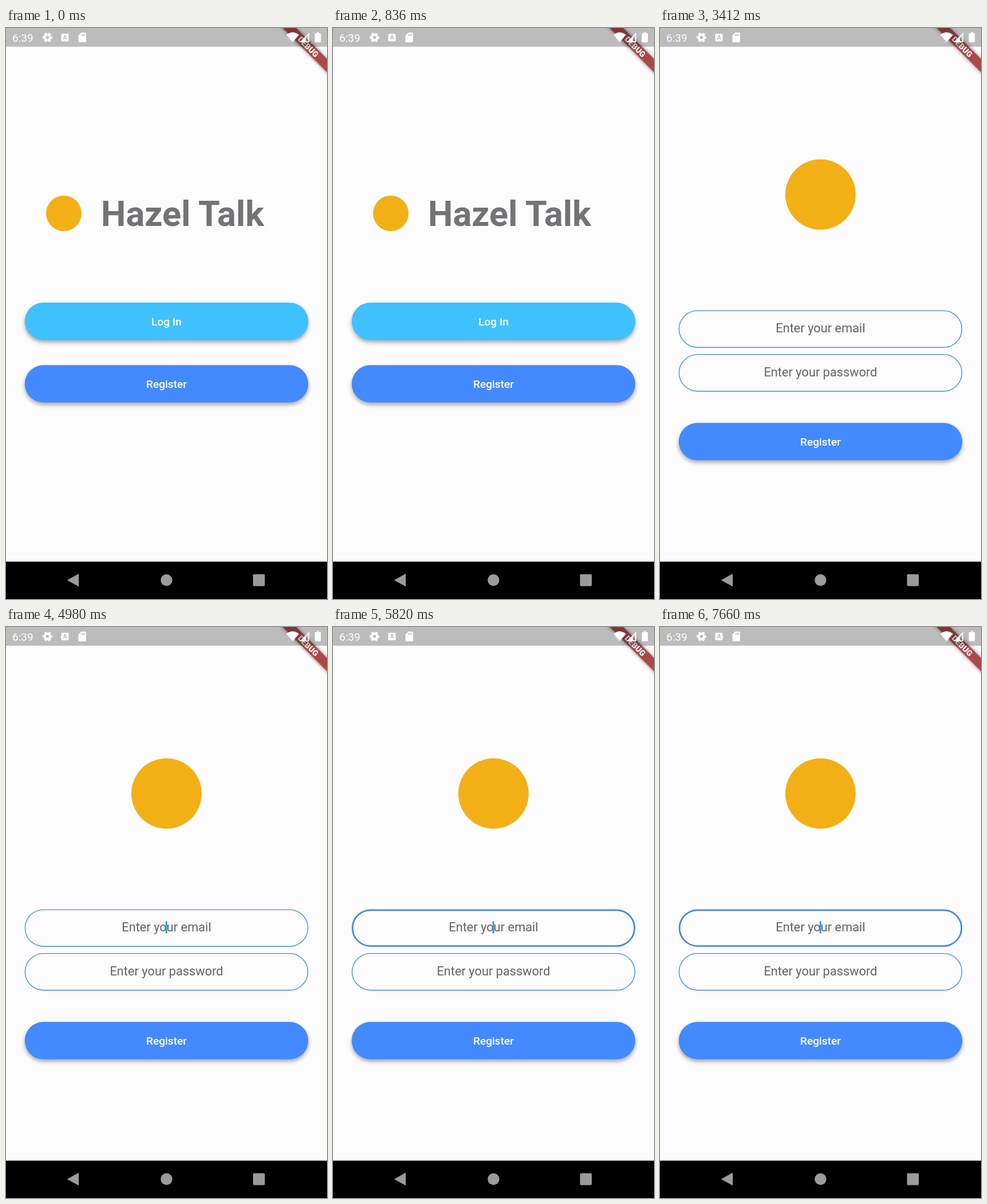
These frames come from a looping animation (561x998 px, 8000 ms). An HTML page:

```html
<!DOCTYPE html>
<html lang="en">
<head>
<meta charset="utf-8">
<title>Sign-up screens</title>
<style>
  html, body { margin: 0; width: 100%; height: 100%; overflow: hidden; background: #fcfcfd; }
  svg { display: block; width: 100%; height: 100%; font-family: Roboto, sans-serif; }
  .logo { fill: #f3b016; }
  .title { font-size: 61.4px; font-weight: 700; fill: #737376; }
  .button rect { filter: drop-shadow(0 4px 3.5px rgba(0, 0, 0, .34)); }
  .button text { font-size: 19.1px; font-weight: 500; fill: #fff; text-anchor: middle; }
  .field rect { fill: none; stroke: #4287f2; stroke-width: 1.36; }
  .field text { font-size: 21.8px; fill: #646466; text-anchor: middle; }
  .banner rect { fill: #ab4848; filter: drop-shadow(0 0 3px rgba(0, 0, 0, .5)); }
  .banner text { font-size: 13.9px; font-weight: 900; fill: #fff; text-anchor: middle; }
  .status { fill: #fff; }
  .nav { fill: #9b9b97; }
</style>
</head>
<body>
<svg viewBox="0 0 561 998">
  <rect width="561" height="998" fill="#fcfcfd"/>

  <g id="welcome">
    <circle class="logo" cx="101" cy="324" r="31"/>
    <text class="title" x="166" y="346">Hazel Talk</text>
  </g>
  <g id="signup">
    <circle class="logo" cx="280.5" cy="291" r="61.5"/>
  </g>
  <rect id="cursor" x="278.9" y="514" width="2.7" height="21.8" rx="1.2" fill="#1e98f2"/>

  <g class="banner" transform="translate(561 0) rotate(45)">
    <rect x="-80" y="38.2" width="160" height="16.4"/>
    <text y="51.3">DEBUG</text>
  </g>

  <g class="status">
    <rect width="561" height="32.7" fill="#000" fill-opacity=".255"/>
    <text x="11" y="23.6" font-size="19">6:39</text>
    <g fill="none" stroke="#fff">
      <circle cx="72.5" cy="16.5" r="4.8" stroke-width="4"/>
      <circle cx="72.5" cy="16.5" r="7.3" stroke-width="2.6" stroke-dasharray="4.2 3.445" stroke-dashoffset="2.1"/>
    </g>
    <rect x="96.5" y="10" width="13" height="13.3" rx="1.5"/>
    <text x="103" y="20.2" font-size="10" font-weight="700" text-anchor="middle" fill="#bababc">A</text>
    <path d="M131.5 8H138.5Q140 8 140 9.5V23.5Q140 25 138.5 25H128Q126.5 25 126.5 23.5V13Z"/>
    <path d="M132 10.5v3.5M134.7 10.5v3.5M137.4 10.5v3.5" stroke="#bababc" stroke-width="1.4"/>
    <path d="M490 12Q501 3 512 12L501 25Z"/>
    <path d="M530 8V25H513.5Z" fill-opacity=".3"/>
    <path d="M529.2 10V24.2H515.5Z" fill="none" stroke="#fff" stroke-width="1.6"/>
    <path d="M524 14.5V25H513.5Z"/>
    <path d="M543 7.5h4V9h2q1.3 0 1.3 1.3v13.4q0 1.3-1.3 1.3h-8q-1.3 0-1.3-1.3V10.3q0-1.3 1.3-1.3h2Z"/>
  </g>

  <rect y="932.7" width="561" height="65.3"/>
  <g class="nav">
    <path d="M108 965L126.5 954.8V975.2Z" stroke="#9b9b97" stroke-width="1.4" stroke-linejoin="round"/>
    <circle cx="280.5" cy="965" r="10.2"/>
    <rect x="431.7" y="954.8" width="20.6" height="20.6" rx="1.8"/>
  </g>
</svg>
<script>
  const LOOP = 8000, SIGNUP_AT = 1060, CURSOR_AT = 4980, FOCUS_AT = 5820;
  const LEFT = 32.7, WIDTH = 495.6, HEIGHT = 65.4;
  const byId = id => document.getElementById(id);
  const welcome = byId('welcome'), signup = byId('signup'), cursor = byId('cursor');

  function add(parent, tag, attributes, text = '') {
    const node = document.createElementNS(parent.namespaceURI, tag);
    for (const [key, value] of Object.entries(attributes)) node.setAttribute(key, value);
    node.textContent = text;
    return parent.appendChild(node);
  }

  function addPill(parent, kind, top, label, baseline, fill) {
    const group = add(parent, 'g', { class: kind });
    const pill = add(group, 'rect', fill ? { fill } : {});
    add(group, 'text', { x: 280.5, y: baseline }, label);
    setPill(pill, top, fill ? 0 : 1.36);
    return pill;
  }

  // The outline stays inside the pill's box at any stroke width.
  function setPill(pill, top, stroke) {
    const box = {
      x: LEFT + stroke / 2, y: top + stroke / 2,
      width: WIDTH - stroke, height: HEIGHT - stroke, rx: (HEIGHT - stroke) / 2
    };
    for (const [key, value] of Object.entries(box)) pill.setAttribute(key, value);
    pill.style.strokeWidth = stroke;
  }

  addPill(welcome, 'button', 480, 'Log In', 519.6, '#3fc1fe');
  addPill(welcome, 'button', 589.2, 'Register', 628.6, '#4389ff');
  const email = addPill(signup, 'field', 493.5, 'Enter your email', 532.2);
  addPill(signup, 'field', 570, 'Enter your password', 608.6);
  addPill(signup, 'button', 690.2, 'Register', 729.7, '#4389ff');

  const show = (node, visible) => { node.style.display = visible ? '' : 'none'; };

  function draw(now) {
    const time = now % LOOP;
    show(welcome, time < SIGNUP_AT);
    show(signup, time >= SIGNUP_AT);
    show(cursor, time >= CURSOR_AT);
    setPill(email, 493.5, time >= FOCUS_AT ? 2.73 : 1.36);
  }

  let start;
  function tick(now) {
    start ??= now;
    draw(now - start);
    requestAnimationFrame(tick);
  }
  draw(0);
  requestAnimationFrame(tick);
</script>
</body>
</html>
```
